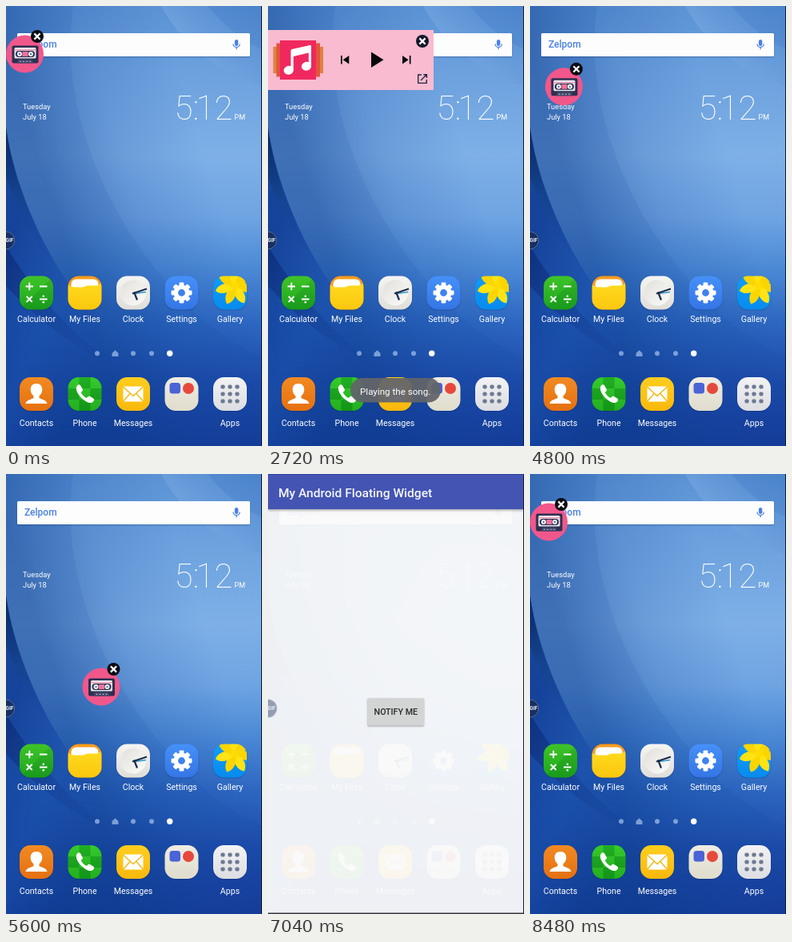
An HTML page with a canvas that plays this animation: 320 by 550 pixels, repeating every 9600 ms.

```html
<!DOCTYPE html>
<html lang="en">
<head>
<meta charset="utf-8">
<title>Floating widget</title>
<style>
html, body { margin: 0; width: 100%; height: 100%; overflow: hidden; background: #153a98; }
canvas { display: block; width: 320px; height: 550px; }
</style>
</head>
<body>
<canvas id="stage"></canvas>
<script>
const W = 320, H = 550, LOOP = 9600, STEP = 160;
const canvas = document.getElementById('stage');
const ratio = Math.max(1, window.devicePixelRatio || 1);
canvas.width = W * ratio;
canvas.height = H * ratio;
const g = canvas.getContext('2d');
g.scale(ratio, ratio);

// ---- drawing helpers ----
function box(x, y, w, h, r, fill) {
  g.beginPath();
  g.roundRect(x, y, w, h, r);
  g.fillStyle = fill;
  g.fill();
}
function disc(x, y, r, fill) {
  g.beginPath();
  g.arc(x, y, r, 0, Math.PI * 2);
  g.fillStyle = fill;
  g.fill();
}
function shape(d, fill) {
  g.fillStyle = fill;
  g.fill(new Path2D(d));
}
function stroke(d, color, width, cap = 'butt') {
  g.strokeStyle = color;
  g.lineWidth = width;
  g.lineCap = cap;
  g.stroke(new Path2D(d));
}
function text(s, x, y, size, { weight = 400, align = 'left', fill = '#fff' } = {}) {
  g.font = `${weight} ${size}px Roboto, sans-serif`;
  g.textAlign = align;
  g.fillStyle = fill;
  g.fillText(s, x, y);
}
function blend(x0, y0, x1, y1, ...stops) {
  const grad = g.createLinearGradient(x0, y0, x1, y1);
  stops.forEach(([at, color]) => grad.addColorStop(at, color));
  return grad;
}
function at(x, y, alpha, draw) {
  g.save();
  g.translate(x, y);
  g.globalAlpha *= alpha;
  draw();
  g.restore();
}
function shadow(color, blur, dy) {
  g.shadowColor = color;
  g.shadowBlur = blur * ratio;
  g.shadowOffsetY = dy * ratio;
}

// ---- home screen ----
function wallpaper() {
  box(0, 0, W, H, 0, blend(0, 0, 0, H,
    [0, '#5a92d4'], [.15, '#6ca1de'], [.34, '#7eb0e7'], [.48, '#6ea4e2'],
    [.6, '#4a88d5'], [.72, '#2d67c1'], [.85, '#1d4baa'], [1, '#153a98']));
  box(0, 0, W, H, 0, blend(0, 60, 190, 0,
    [0, 'rgba(14,60,140,.5)'], [.5, 'rgba(20,70,155,.18)'], [1, 'rgba(20,70,155,0)']));
  shape('M0 0H84C70 90 96 220 200 345C245 400 290 425 320 440V550H0Z', 'rgba(18,70,160,.1)');
  shape('M194 0C220 48 262 82 320 100V0Z',
    blend(215, 60, 320, 0, [0, 'rgba(160,200,245,.28)'], [1, 'rgba(40,100,185,.14)']));
  shape('M252 0C272 24 294 42 320 54V0Z', 'rgba(40,95,180,.16)');
  shape('M0 152C12 232 52 322 112 392C142 426 172 446 205 462L120 550H0Z',
    blend(0, 300, 150, 380, [0, 'rgba(16,60,150,.85)'], [.55, 'rgba(26,80,175,.6)'], [1, 'rgba(26,75,170,0)']));
  shape('M0 152C9 215 32 275 62 325C38 300 14 255 0 214Z',
    blend(0, 160, 40, 310, [0, '#0c2b66'], [.5, '#14438f'], [1, 'rgba(24,75,165,.3)']));
  shape('M0 300C30 350 75 405 140 452C80 425 32 385 0 350Z',
    blend(0, 310, 140, 450, [0, 'rgba(10,38,110,.6)'], [1, 'rgba(20,60,150,0)']));
}

function searchBar() {
  g.save();
  shadow('rgba(10,40,100,.4)', 2, 1);
  box(14, 34, 291, 29, 1.5, '#fdfdfe');
  g.restore();
  text('Zelpom', 23, 52.3, 12, { weight: 500, fill: '#4a80e4' });
  box(285.9, 42, 4.4, 8, 2.2, '#4a80e4');
  stroke('M284 47.5a4.1 4.1 0 0 0 8.2 0M288.1 51.6V54.3', '#4a80e4', 1.3);
}

function clockText() {
  text('Tuesday', 21, 129, 9.3);
  text('July 18', 21, 142, 9.3);
  [['5', 222], [':', 237.5], ['1', 249], ['2', 272]].forEach(([c, x]) =>
    text(c, x, 142, 42, { weight: 100, align: 'center' }));
  text('PM', 285.5, 142, 9);
}

function tile(top, bottom) {
  g.save();
  shadow('rgba(5,20,70,.35)', 1.5, .6);
  box(-21, -21, 42, 42, 13.5, blend(0, -21, 0, 21, [0, top], [1, bottom]));
  g.restore();
}
function clipTile() {
  g.beginPath();
  g.roundRect(-21, -21, 42, 42, 13.5);
  g.clip();
}

const icons = {
  Calculator() {
    tile('#3fc428', '#1da51e');
    clipTile();
    shape('M21 -21V21H-21Z', 'rgba(0,100,20,.16)');
    stroke('M-13.5 -8H-4M-8.7 -12.8V-3.2M4 -8H13.5M-12.3 4.5l7 7M-5.3 4.5l-7 7M4 8H13.5', '#fff', 1.9);
    disc(8.8, 4.2, 1.3, '#fff');
    disc(8.8, 11.8, 1.3, '#fff');
  },
  'My Files'() {
    tile('#f79a1c', '#f9a81e');
    clipTile();
    box(-17, -17, 34, 26, 6, '#fff');
    shape('M-21 -11C-19 -8 -16 -7 -12 -7H-4C0 -7 1 -9 5 -9H13C17 -9 20 -11 21 -13V21H-21Z',
      blend(0, -10, 0, 21, [0, '#ffd91c'], [1, '#fbc70e']));
  },
  Clock() {
    tile('#f5f5f2', '#dfded9');
    disc(0, 0, 16, blend(-12, -12, 12, 12, [0, '#e4e3df'], [1, '#f8f8f6']));
    stroke('M2 1L16 -1', '#3597c8', 1.5);
    stroke('M-1 1L17 -5', '#1b2c4c', 2);
    stroke('M1 -1L5 9', '#1b2c4c', 2.2);
  },
  Settings() {
    tile('#4690f8', '#3475e4');
    g.fillStyle = '#fff';
    for (let i = 0; i < 8; i++) {
      g.save();
      g.rotate(i * Math.PI / 4);
      g.beginPath();
      g.roundRect(-2.9, -13, 5.8, 8, 1.3);
      g.fill();
      g.restore();
    }
    disc(0, 0, 10, '#fff');
    disc(0, 0, 4.4, '#3d82ee');
  },
  Gallery() {
    tile('#109cfb', '#078bee');
    clipTile();
    g.translate(6, -9);
    for (let i = 0; i < 7; i++) {
      g.save();
      g.rotate(.18 + i * Math.PI * 2 / 7);
      shape('M0 0C5 -6 18 -9 25 0C18 9 5 6 0 0Z', i % 2 ? '#ffe312' : '#fbd500');
      g.restore();
    }
    disc(0, 0, 5, '#fddc06');
  },
  Contacts() {
    tile('#f28a22', '#e5700f');
    shape('M0 -13C5 -13 7.3 -10 7.3 -5.5C7.3 -2 5.5 1 3.5 2.5V5C7 7 12.5 7.5 13.5 12H-13.5C-12.5 7.5 -7 7 -3.5 5V2.5C-5.5 1 -7.3 -2 -7.3 -5.5C-7.3 -10 -5 -13 0 -13Z', '#fff');
  },
  Phone() {
    tile('#2bc42a', '#17a41c');
    g.save();
    clipTile();
    for (let i = 0; i < 9; i++)
      box(-21 + i % 3 * 14, -21 + Math.floor(i / 3) * 14, 14, 14, 0,
        i % 2 ? 'rgba(0,85,10,.2)' : 'rgba(120,240,60,.12)');
    g.restore();
    shape('M-10 -10C-8 -12.5 -6 -12 -5 -10L-2.8 -6C-2 -4.3 -3.5 -3.2 -4.8 -2C-3 1.5 -1 3.5 2.3 5C3.5 3.5 4.8 2 6.5 3L10.3 5.3C12.3 6.6 12 8.2 10 10C4 15.5 -14.5 -2 -10 -10Z', '#fff');
  },
  Messages() {
    tile('#ffce1e', '#f9b80c');
    box(-12.5, -9.5, 25, 19, 1, '#fff');
    stroke('M-12.5 -9L0 2.5L12.5 -9M-12.5 9.3L-3.8 -.8M12.5 9.3L3.8 -.8', '#f5b70f', 1.4);
  },
  folder() {
    tile('#efede3', '#dfdccd');
    box(-15, -14, 13.5, 13.5, 3.5, '#4a63d6');
    disc(8.5, -7, 7, '#e6493c');
  },
  Apps() {
    tile('#f3f3f5', '#dcdde2');
    for (let i = 0; i < 9; i++)
      box(-11.6 + i % 3 * 9, -11.6 + Math.floor(i / 3) * 9, 5.2, 5.2, 1.8, '#6e7a92');
  }
};

function home() {
  wallpaper();
  searchBar();
  clockText();
  Object.keys(icons).forEach((name, i) => {
    const x = 38 + i % 5 * 60.5, y = i < 5 ? 358.5 : 485;
    at(x, y, 1, icons[name]);
    if (name !== 'folder') text(name, x, y + (i < 5 ? 36 : 40), 10.6, { align: 'center' });
  });
  const dim = 'rgba(190,215,250,.6)';
  [114, 159, 182].forEach(x => disc(x, 434.3, 3, dim));
  shape('M136.5 430.3L140.5 434V438H132.5V434Z', dim);
  disc(204.7, 434.3, 3.7, '#fff');
}

// ---- overlays ----
function badge(x, y, fill) {
  disc(x, y, 8, fill);
  stroke(`M${x - 3.6} ${y - 3.6}l7.2 7.2m0 -7.2l-7.2 7.2`, '#fff', 2.2);
}

function bubble() {
  disc(23.5, 30, 23.5, '#f2578b');
  box(7.5, 19.5, 33, 22, 2, '#2c3050');
  box(10.5, 22, 27, 13.5, 1.5, '#e9e8ee');
  box(10.5, 24.2, 27, 1.2, 0, '#f08aa9');
  box(12, 26, 24, 8, 4, '#2c3050');
  box(20.5, 27, 7, 6, .5, '#f0719a');
  [17, 31].forEach(x => {
    disc(x, 30, 3, '#f3f3f7');
    disc(x, 30, 1.2, '#5a78b8');
  });
  shape('M14 41.5L15.5 37H32.5L34 41.5Z', '#454a6c');
  [18, 22, 26, 30].forEach(x => disc(x, 39.4, .7, '#e0e0ea'));
  badge(39, 8, '#0b0c14');
}

function panel() {
  box(0, 0, 207, 75, 0, '#f8bbd0');
  box(6.5, 21, 62.5, 33, 0, '#e0823f');
  box(10.5, 16.5, 54.5, 42, 0, '#e2553c');
  box(15, 13, 45, 49, 0, '#f0285f');
  shape('M28.5 26Q28.5 24.5 30 24L52.5 19Q54 18.8 54 20V45H50.8V28.6L31.8 33V50H28.5Z', '#fff');
  [[25.8, 50.3], [48, 45.3]].forEach(([x, y]) => {
    g.beginPath();
    g.ellipse(x, y, 6.2, 5.4, -.25, 0, Math.PI * 2);
    g.fillStyle = '#fff';
    g.fill();
  });
  shape('M91 32h1.7v10.4h-1.7zM101.3 32v10.4l-7.6 -5.2zM129 27.5v19.4l15.5 -9.7z' +
    'M168 32v10.4l7.6 -5.2zM176.8 32h1.7v10.4h-1.7z', '#08080c');
  badge(193, 14, '#15182a');
  stroke('M192 56H187.7V66.4H198.2V62M194.3 55.7H198.4V60M198 56L191 63', '#252a42', 1.4);
}

function toast(alpha) {
  at(0, 0, alpha, () => {
    box(103, 465, 113, 30.5, 15.2, 'rgba(98,100,106,.94)');
    text('Playing the song.', 115, 486, 11.6);
  });
}

function app(alpha, pressed) {
  at(0, 0, alpha, () => {
    box(0, 0, W, H, 0, '#fafafa');
    g.save();
    shadow('rgba(0,0,0,.35)', 3, 1.5);
    box(0, 0, W, 44, 0, '#3f51b5');
    shadow('rgba(0,0,0,.35)', 2, 1);
    box(124.5, 280, 70.5, 34.5, 1.5, pressed ? '#bfc0c1' : '#d6d7d7');
    g.restore();
    box(0, 0, W, 1, 0, '#303f9f');
    text('My Android Floating Widget', 13, 29, 15.55, { weight: 500 });
    text('NOTIFY ME', 159.8, 301, 10.7, { weight: 500, align: 'center', fill: '#212126' });
    box(0, H - 1.5, W, 1.5, 0, '#2a2c34');
  });
}

function recorder(appAlpha) {
  disc(-.3, 293, 11.5, `rgba(24,42,82,${.78 - .38 * appAlpha})`);
  g.beginPath();
  g.arc(-.3, 293, 11, 0, Math.PI * 2);
  g.strokeStyle = 'rgba(190,205,230,.5)';
  g.lineWidth = .8;
  g.stroke();
  text('GIF', -.5, 295.4, 6.5, { weight: 700, fill: '#e6ebf5' });
}

// ---- timeline ----
const within = (t, from, to) => t >= from && t < to;
function ramp(t, start, values) {
  const i = Math.floor((t - start) / STEP);
  return values[Math.min(i, values.length - 1)];
}
function toastAlpha(t) {
  if (!within(t, 2080, 4480)) return 0;
  return t < 3520 ? ramp(t, 2080, [0, .3, .65, .9, 1]) : ramp(t, 3520, [1, .75, .4, .14, .04, 0]);
}
function appAlpha(t) {
  if (!within(t, 6560, 8480)) return 0;
  return t < 7680 ? ramp(t, 6560, [.12, .45, .8, .95, 1]) : ramp(t, 7680, [1, 1, .75, .35, .1, 0]);
}
function widgetPlace(t) {
  if (!within(t, 4480, 6560)) return [0, 30];
  const p = Math.min(1, (t - 4480) / 1120);
  const e = p * p * (3 - 2 * p);
  return [95.5 * e, 30 + 206 * e];
}

function draw(t) {
  const shown = appAlpha(t);
  g.clearRect(0, 0, W, H);
  home();
  if (shown) app(shown, within(t, 7680, 8000));
  recorder(shown);
  const open = within(t, 800, 3520) || within(t, 5920, 6560);
  const [x, y] = widgetPlace(t);
  if (!within(t, 6560, 8000)) at(x, y, 1, open ? panel : bubble);
  const alpha = toastAlpha(t);
  if (alpha) toast(alpha);
  box(W - 1, 0, 1, H, 0, '#101a34');
}

const begun = performance.now();
function tick() {
  const t = (performance.now() - begun) % LOOP;
  draw(Math.floor(t / STEP) * STEP);
  requestAnimationFrame(tick);
}
tick();
</script>
</body>
</html>
```
